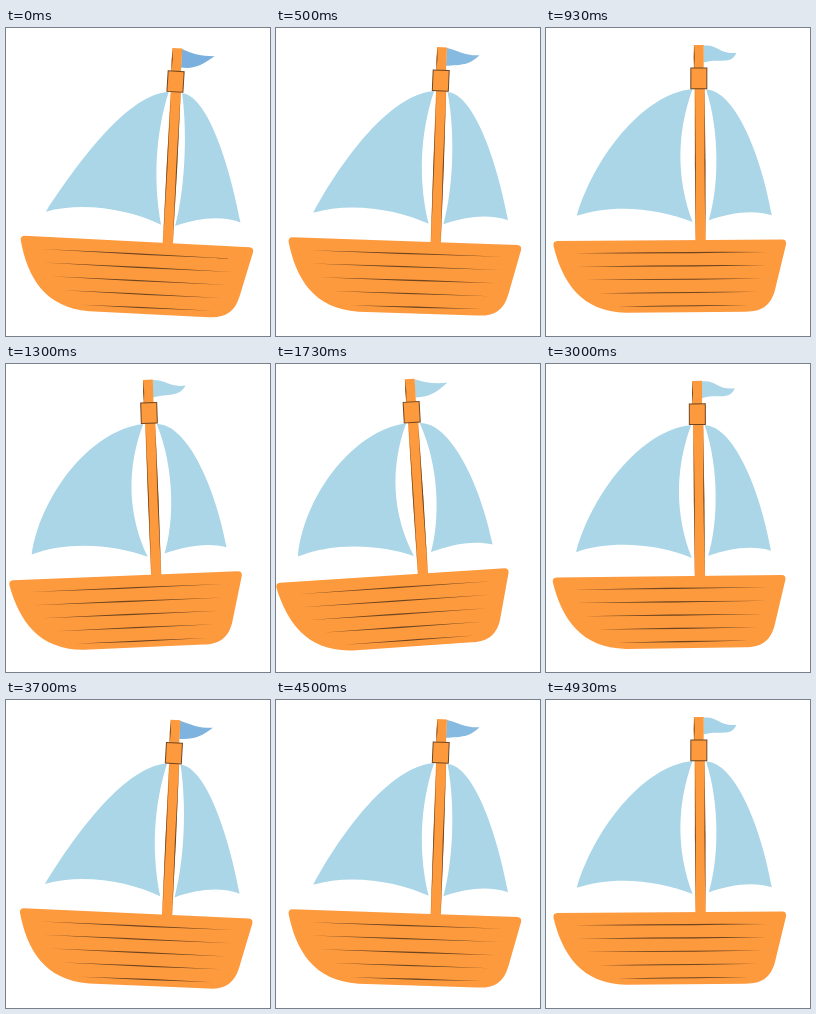
Write an HTML page with a canvas that moves like this. It is 264 px wide and 308 px high and loops after 5000 ms.

```html
<!DOCTYPE html>
<html lang="en">
<head>
<meta charset="utf-8">
<title>Rocking sailboat</title>
<style>
  html, body { margin: 0; width: 100%; height: 100%; overflow: hidden; background: #fff; }
  canvas { display: block; width: 264px; height: 308px; }
</style>
</head>
<body>
<canvas id="stage" width="264" height="308"></canvas>
<script>
const ctx = document.getElementById('stage').getContext('2d');
const LOOP = 5000, SWING = 4000;
const PIVOT_X = 107, PIVOT_Y = 340;
const TILT = 3.45 * Math.PI / 180, LAG = 0.003;
const WOOD = '#fd9a3e', LINE = '#70451f', SAIL = '#aad6e8';

function fillShape(color, trace) {
  ctx.beginPath();
  trace();
  ctx.closePath();
  ctx.fillStyle = color;
  ctx.fill();
}

// A stroke that is thickest in the middle and thins out at both ends.
function taper(x1, y1, x2, y2, width) {
  const length = Math.hypot(x2 - x1, y2 - y1);
  const nx = (y1 - y2) / length * width, ny = (x2 - x1) / length * width;
  const mx = (x1 + x2) / 2, my = (y1 + y2) / 2;
  fillShape(LINE, () => {
    ctx.moveTo(x1, y1);
    ctx.quadraticCurveTo(mx + nx, my + ny, x2, y2);
    ctx.quadraticCurveTo(mx - nx, my - ny, x1, y1);
  });
}

// The wind (0 to 1) pushes the edges of both sails outward.
function drawSails(wind) {
  fillShape(SAIL, () => {
    ctx.moveTo(30.5, 188);
    ctx.bezierCurveTo(62 - 24 * wind, 133, 106 - 17 * wind, 66, 146, 61);
    ctx.bezierCurveTo(135 - 8 * wind, 105.5, 136 - 9 * wind, 151.5, 146.3, 194);
    ctx.bezierCurveTo(115.5, 181, 67, 175, 30.5, 188);
  });
  fillShape(SAIL, () => {
    const footX = 160.5 + 3 * wind, footY = 194.5 - 3.5 * wind;
    ctx.moveTo(159.5, 61.5);
    ctx.bezierCurveTo(183 + 6 * wind, 62, 209 + 7 * wind, 122, 225.5, 187);
    ctx.bezierCurveTo(206, 181, 183, 185, footX, footY);
    ctx.bezierCurveTo(167.5 + 7 * wind, 160, 168 + 9 * wind, 106, 159.5, 61.5);
  });
}

// The flag waves most when the boat is upright and pales as it leans left.
function drawFlag(wave, pale) {
  const color = `rgb(${123 + 47 * pale}, ${176 + 38 * pale}, ${222 + 10 * pale})`;
  fillShape(color, () => {
    ctx.moveTo(156.8, 17.5);
    ctx.bezierCurveTo(168 + 4 * wave, 22 - 6 * wave, 177 - 5 * wave, 23.5 + 3 * wave, 189.7, 22.6 + 2 * wave);
    ctx.bezierCurveTo(178 + 6 * wave, 31 + 7 * wave, 172, 37 - 8 * wave, 156.8, 36 - 1.5 * wave);
  });
}

function drawMast() {
  ctx.fillStyle = WOOD;
  ctx.fillRect(147.1, 17, 9.9, 24);
  taper(147.5, 17, 147.5, 41, 1);
  fillShape(WOOD, () => {
    ctx.moveTo(147.9, 60);
    ctx.lineTo(158.2, 60);
    ctx.lineTo(159.4, 213);
    ctx.lineTo(149.1, 213);
  });
  taper(148.4, 60, 149.4, 213, 0.9);
  taper(157.9, 60, 159.1, 213, 1.1);
  ctx.fillStyle = WOOD;
  ctx.strokeStyle = LINE;
  ctx.lineWidth = 1;
  ctx.fillRect(144.2, 40, 16, 20.6);
  ctx.strokeRect(144.2, 40, 16, 20.6);
}

function drawHull() {
  fillShape(WOOD, () => {
    ctx.moveTo(11, 213.2);
    ctx.lineTo(236, 211.3);
    ctx.quadraticCurveTo(240.5, 211.5, 239.8, 216);
    ctx.lineTo(229, 261);
    ctx.bezierCurveTo(225, 277, 216, 283.5, 199, 283.5);
    ctx.lineTo(80, 284.8);
    ctx.bezierCurveTo(35, 284, 16, 254, 7.2, 218);
    ctx.quadraticCurveTo(6.5, 213.5, 11, 213.2);
  });
  for (let i = 0; i < 5; i++) {
    const y = 225.5 + i * 13.3;
    taper(28 + 2.7 * i * i, y, 222 - 1.2 * i * i, y - 1.8, 1.3);
  }
}

// Ease-in-out with control points at 0.42 and 0.58, solved by Newton steps.
function easeInOut(x) {
  let u = x;
  for (let i = 0; i < 6; i++) {
    u -= (1.26 * u - 0.78 * u * u + 0.52 * u ** 3 - x) / (1.26 - 1.56 * u + 1.56 * u * u);
  }
  return u * u * (3 - 2 * u);
}

// The picture steps twice per 100 ms, holding 30 ms and then 70 ms.
function steppedTime(ms) {
  const t = ms % LOOP;
  return Math.floor(t / 100) * 100 + (t % 100 >= 30 ? 50 : 0);
}

function draw(ms) {
  const phase = (steppedTime(ms) % SWING) / (SWING / 2);
  const lean = easeInOut(phase < 1 ? phase : 2 - phase);
  const wave = Math.sin(Math.PI * lean);

  ctx.setTransform(1, 0, 0, 1, 0, 0);
  ctx.fillStyle = '#fff';
  ctx.fillRect(0, 0, 264, 308);
  ctx.translate(PIVOT_X, PIVOT_Y);
  ctx.rotate(TILT * (1 - 2 * lean) - LAG * wave);
  ctx.translate(-PIVOT_X, -PIVOT_Y);

  drawSails(Math.sin(Math.PI / 2 * lean));
  drawFlag(wave, Math.min(1, 2 * lean));
  drawMast();
  drawHull();
}

const start = performance.now();
function tick() {
  draw(performance.now() - start);
  requestAnimationFrame(tick);
}
tick();
</script>
</body>
</html>
```
